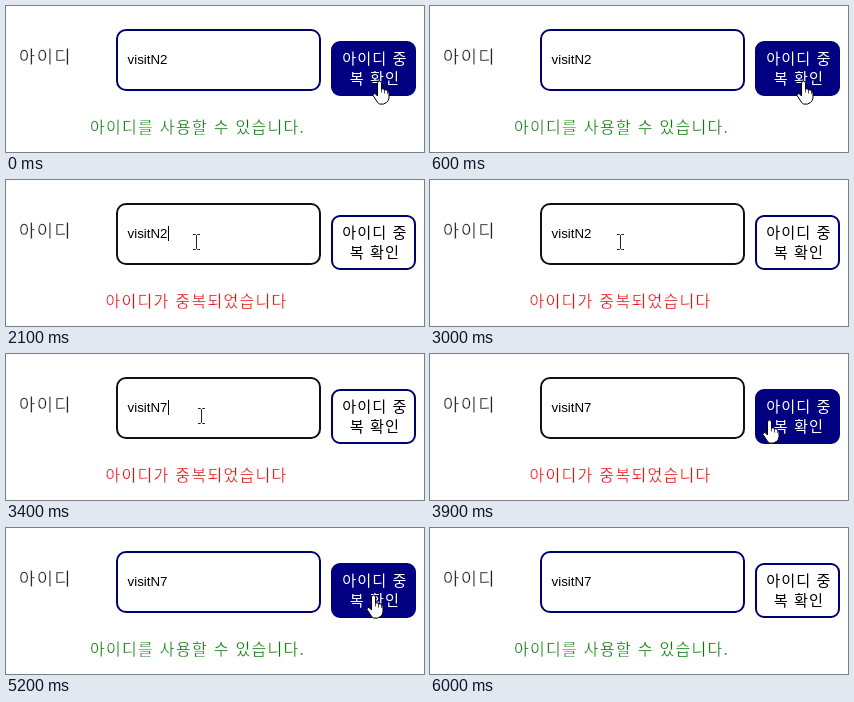
Recreate the animation shown at these times as an HTML page. Size 418 by 146 pixels, loop 6100 ms.

```html
<!DOCTYPE html>
<html lang="ko">
<head>
<meta charset="utf-8">
<style>
  html, body { margin: 0; width: 100%; height: 100%; overflow: hidden; background: #fff; }
  svg { display: block; font-family: "Noto Sans CJK KR", "Noto Sans CJK", "Noto Sans CJK JP", sans-serif; }
  rect { fill: #fff; stroke: #00006e; stroke-width: 2; }
  #label, #message { font-weight: 300; stroke: #fff; stroke-width: .3; }
  #label { font-size: 17.6px; letter-spacing: 1.5px; fill: #222; }
  #message { font-size: 16px; letter-spacing: 1.3px; }
  #value { font: 13.33px "Liberation Sans", Arial, sans-serif; }
  #button { font-size: 15.2px; font-weight: 300; letter-spacing: 1px; text-anchor: middle; }
  #button.hover { fill: #fff; }
  #button.hover rect { fill: navy; stroke: navy; }
  #input.focus rect { stroke: #111; }
</style>
</head>
<body>
<svg width="418" height="146" viewBox="0 0 418 146">
  <text id="label" x="13" y="57">아이디</text>
  <g id="input">
    <rect x="111" y="24" width="203" height="60" rx="9"/>
    <text id="value" x="121.5" y="58"></text>
    <path id="caret" d="M0 46V61" stroke="#000"/>
  </g>
  <g id="button">
    <rect x="326" y="36" width="83" height="53" rx="8"/>
    <text x="368.8" y="57.5">아이디 중</text>
    <text x="368.8" y="77.5">복 확인</text>
  </g>
  <text id="message" y="127"></text>
  <g id="cursor">
    <path id="beam" fill="none" stroke="#222" d="M-3.5 -7.5H-1L0 -6.5L1 -7.5H3.5M0 -6.5V6.5M-3.5 7.5H-1L0 6.5L1 7.5H3.5"/>
    <g id="hand" stroke="#000" stroke-linejoin="round">
      <path fill="#fff" d="M-2 1.5Q0 -1.5 2 1.5V8Q4 7 5 9Q7 8 8 10Q9.5 10 9.5 12V17Q9 20 7 21.5Q4 24 0 23Q-2 22 -3.5 19L-6.5 14.5Q-6.5 12 -4.5 12.5L-2 15Z"/>
      <path fill="none" stroke-width=".7" d="M2 8V11.5M5 9V12.5M8 10V13"/>
    </g>
  </g>
</svg>
<script>
const LOOP = 6100, STEP = 100;
const $ = id => document.getElementById(id);
const show = (id, on) => $(id).setAttribute('visibility', on ? 'visible' : 'hidden');

// Pointer path: time, x, y
const path = [
  [0, 373, 75], [1400, 373, 75], [1600, 243, 67], [2100, 190, 62],
  [3300, 190, 62], [3400, 195, 62], [3600, 195, 62],
  [4100, 367, 67], [5200, 367, 67], [5600, 220, 70], [LOOP, 220, 70]
];

function pointerAt(t) {
  const i = path.findIndex(p => p[0] > t);
  const [t0, x0, y0] = path[i - 1], [t1, x1, y1] = path[i];
  const k = 1 - (1 - (t - t0) / (t1 - t0)) ** 2;
  return [Math.round(x0 + (x1 - x0) * k), Math.round(y0 + (y1 - y0) * k)];
}

function draw(now) {
  const t = Math.floor(now % LOOP / STEP) * STEP;
  const [x, y] = pointerAt(t);
  const hover = x >= 325, visible = t < 5700;
  const focused = t >= 2100 && t < 4400;
  const taken = t >= 1000 && t < 4600;
  const edited = t >= 3400;

  $('value').textContent = 'visitN' + (t < 3200 ? '2' : edited ? '7' : '');
  $('caret').setAttribute('transform',
    `translate(${Math.round(122 + $('value').getComputedTextLength()) + .5})`);
  const blinkStart = edited ? 3400 : 2100;
  show('caret', focused && (t - blinkStart) % 1000 < 500);

  $('input').classList.toggle('focus', focused);
  $('button').classList.toggle('hover', hover && visible);

  const message = $('message');
  message.textContent = taken ? '아이디가 중복되었습니다' : '아이디를 사용할 수 있습니다.';
  message.setAttribute('x', taken ? 99.5 : 84);
  message.setAttribute('fill', taken ? '#e60f0f' : '#0b780b');

  $('cursor').setAttribute('transform', `translate(${x + .5} ${y})`);
  show('hand', visible && hover);
  show('beam', visible && !hover);
}

const start = performance.now();
function tick() {
  draw(performance.now() - start);
  requestAnimationFrame(tick);
}
tick();
</script>
</body>
</html>
```
